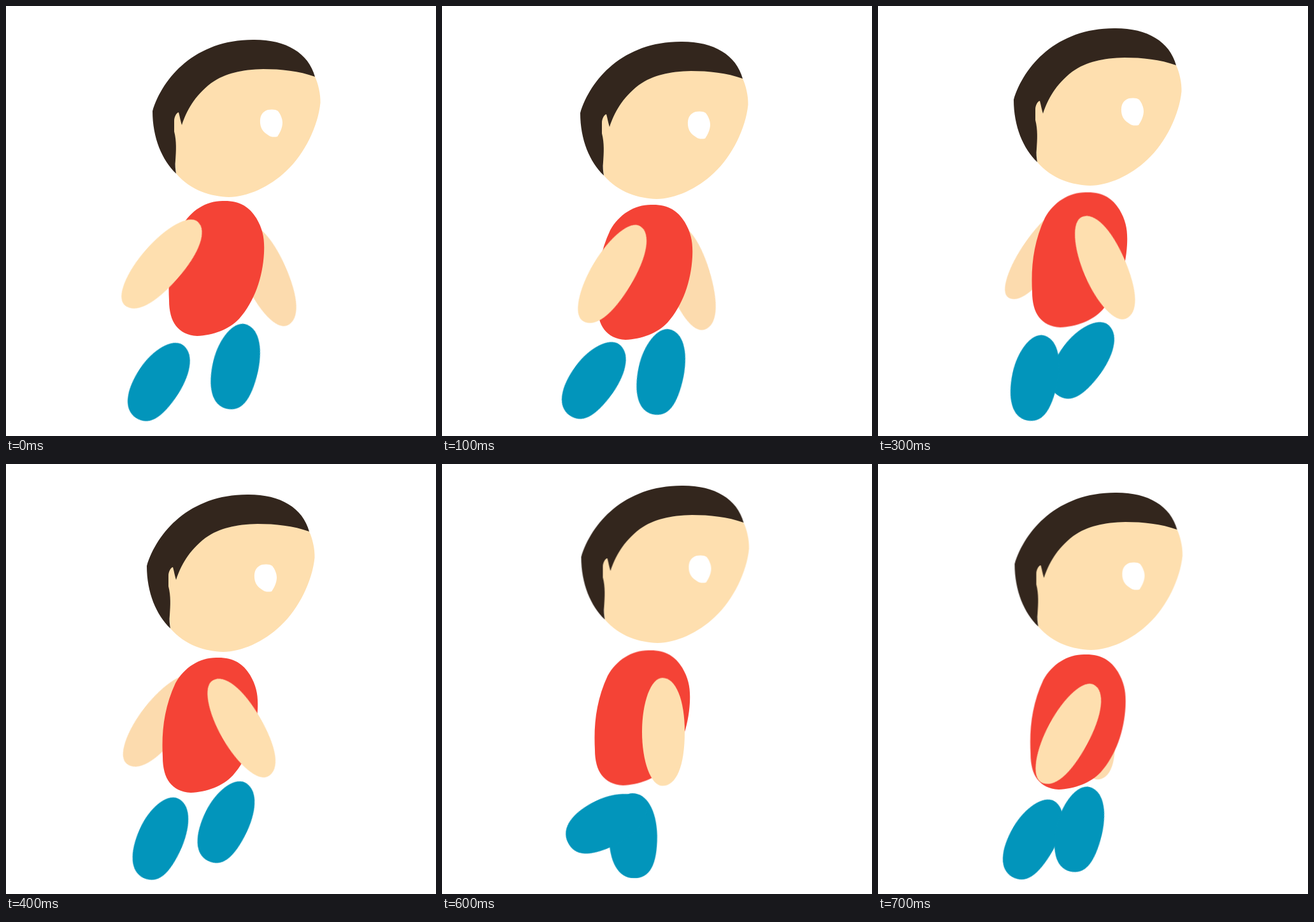
An HTML page that plays this animation: 675 by 675 pixels, repeating every 0.8 s.

```html
<!DOCTYPE html>
<html lang="en">
<head>
<meta charset="utf-8">
<title>Walk cycle</title>
<style>
  html, body { margin: 0; width: 100%; height: 100%; overflow: hidden; background: #fff; }
  svg { display: block; width: 100%; height: 100%; }
  .part { animation: 800ms step-end infinite; }
  .head { animation-name: head; }
  .body { animation-name: body; }
  .arm-back { animation-name: arm-back; fill: #fcdbae; }
  .arm-front { animation-name: arm-front; fill: #fedfaf; }
  .leg { fill: #0295bb; }
  .leg-a { animation-name: leg-a; }
  .leg-b { animation-name: leg-b; }

  @keyframes head {
    0%, 100% { transform: translate(0, 0); }
    12.5% { transform: translate(-13px, 3px); }
    25%   { transform: translate(-24px, -14px); }
    37.5% { transform: translate(-17px, -18px); }
    50%   { transform: translate(-9px, -5px); }
    62.5% { transform: translate(-4.5px, 3.5px); }
    75%   { transform: translate(-11.5px, -19px); }
    87.5% { transform: translate(-15.5px, -8px); }
  }
  @keyframes body {
    0%, 100% { transform: translate(0, 0); }
    12.5% { transform: translate(-12px, 6px); }
    25%   { transform: translate(-22px, -9px); }
    37.5% { transform: translate(-14px, -13.5px); }
    50%   { transform: translate(-10px, -2px); }
    62.5% { transform: translate(-9px, 7.5px); }
    75%   { transform: translate(-16px, -13.5px); }
    87.5% { transform: translate(-16.5px, -7px); }
  }
  @keyframes arm-back {
    0%, 100% { transform: translate(406px, 422px) rotate(-24deg); }
    12.5% { transform: translate(386px, 425px) rotate(-17deg); }
    25%   { transform: translate(359px, 414px) rotate(-7deg); }
    37.5% { transform: translate(254px, 386px) rotate(35deg) scaleX(.85); }
    50%   { transform: translate(243px, 402px) rotate(38deg); }
    62.5% { transform: translate(243px, 414.5px) rotate(34deg); }
    75%   { transform: translate(318px, 405px) rotate(5deg); }
    87.5% { transform: translate(334.5px, 409px) rotate(-8deg); }
  }
  @keyframes arm-front {
    0%, 100% { transform: translate(243.5px, 404px) rotate(41.2deg); }
    12.5% { transform: translate(266px, 420px) rotate(31deg); }
    25%   { transform: translate(294.5px, 423px) rotate(17deg); }
    37.5% { transform: translate(354.5px, 411px) rotate(-23.3deg); }
    50%   { transform: translate(368px, 415px) rotate(-30deg); }
    62.5% { transform: translate(370px, 426px) rotate(-27deg); }
    75%   { transform: translate(346px, 420.5px) scaleY(.975); }
    87.5% { transform: translate(297.5px, 423px) rotate(28.3deg); }
  }
  @keyframes leg-a {
    0%, 100% { transform: translate(239.5px, 588.5px) rotate(33.4deg); }
    12.5% { transform: translate(238px, 586px) rotate(36deg); }
    25%   { transform: translate(269px, 562.5px) rotate(50.4deg) scaleX(1.08); }
    37.5% { transform: translate(320px, 554.5px) rotate(36.5deg); }
    50%   { transform: translate(345px, 561px) rotate(26deg); }
    62.5% { transform: translate(356px, 572.5px) rotate(21.5deg); }
    75%   { transform: translate(299px, 583.5px) scale(1.05, .98); }
    87.5% { transform: translate(242.5px, 588px) rotate(29.9deg); }
  }
  @keyframes leg-b {
    0%, 100% { transform: translate(359.5px, 565.5px) rotate(13.3deg); }
    12.5% { transform: translate(343px, 574px) rotate(12deg); }
    25%   { transform: translate(295px, 583px) rotate(-4deg) scaleX(1.03); }
    37.5% { transform: translate(245.5px, 583.5px) rotate(11.9deg); }
    50%   { transform: translate(242px, 587px) rotate(24deg); }
    62.5% { transform: translate(236.5px, 587.5px) rotate(32.5deg); }
    75%   { transform: translate(257.5px, 562px) rotate(64deg) scaleX(1.05); }
    87.5% { transform: translate(315.5px, 573px) rotate(14deg); }
  }
</style>
</head>
<body>
<svg viewBox="0 0 675 675">
  <defs>
    <path id="arm" d="M0-87C21-87 35-52 35 0C35 55 22 87 0 87C-18 87-32 48-32 0C-32-48-18-87 0-87Z"/>
    <path id="leg" d="M0-68C21-68 36-42 37 0C37 47 26 68 2 68C-21 68-35 42-35 0C-35-36-19-68 0-68Z"/>
  </defs>
  <use href="#arm" class="part arm-back"/>
  <path class="part body" fill="#f44336" d="M340 306C366 305 382 315 393 333C404 352 406 366 405 388C403 426 390 464 366 491C350 508 325 517 300 518C270 516 256 496 256 462C254 422 258 385 276 346C290 321 314 306 340 306Z"/>
  <use href="#arm" class="part arm-front"/>
  <use href="#leg" class="part leg leg-a"/>
  <use href="#leg" class="part leg leg-b"/>
  <g class="part head">
    <path fill="#fedfaf" d="M267 263C290 290 322 299 350 300C378 300 414 284 440 259C469 232 490 188 493.500 152C494 138 490 122 485 111C445 80 300 100 258 160Z"/>
    <path fill="#33261d" d="M267 263C245 242 230 207 230 165C246 112 298 52 390 53C440 53 475 74 485 111C460 102 432 99 404 99C370 100 345 105 322 121C296 141 283 165 276 187C274 181 273 174 271 167C268 167 264 174 264 180L264 197C268 212 267 228 266 242C265 250 266 256 267 263Z"/>
    <path fill="#fff" d="M411 163C416 162 424 162 427 165C431 170 434 177 434 183C434 190 431 198 426 205C421 206 416 206 412 203C404 198 400 193 399 184C398 173 402 166 411 163Z"/>
  </g>
</svg>
</body>
</html>
```
